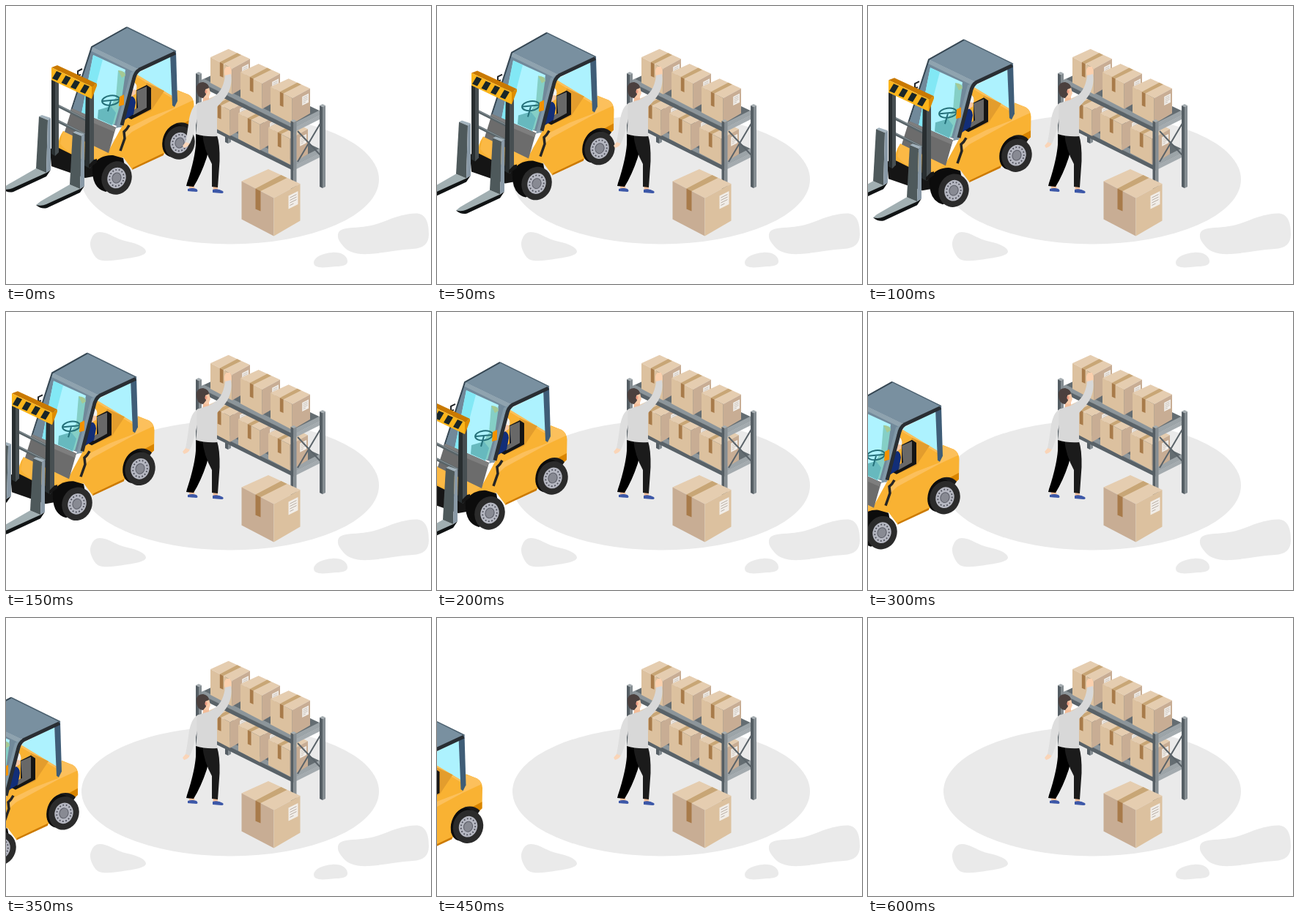
Animation, 580 px wide and 380 px high, one loop 2.6 s. Source, as an HTML page:

```html
<!DOCTYPE html>
<html lang="en">
<head>
<meta charset="utf-8">
<title>Warehouse</title>
<style>
  html, body { margin: 0; width: 100%; height: 100%; overflow: hidden; background: #fff; }
  svg { display: block; }
</style>
</head>
<body>
<svg width="580" height="380" viewBox="0 0 580 380">
  <defs>
    <g id="wheel">
      <ellipse rx="20.5" ry="23" transform="rotate(18)" fill="#2b2b2b"/>
      <ellipse rx="12.5" ry="14.5" transform="rotate(18)" fill="#b5b7c1"/>
      <ellipse rx="9.6" ry="11.4" transform="rotate(18)" fill="none" stroke="#4b4d57" stroke-width="1.8" stroke-dasharray="1.8 2.6"/>
      <ellipse rx="6" ry="7" transform="rotate(18)" fill="#888a93" stroke="#5c5e68"/>
    </g>
    <g id="fork">
      <path d="M41 222L55 228L9 251Q2 254-5 250Q0 245 8 241Z" fill="#a1afb2"/>
      <path d="M55 228L61 224L55 233L10 254Q2 256-5 250Q3 252 9 249Z" fill="#101314"/>
      <path d="M45 151L49 149L61 153L57 156Z" fill="#a3b3bd"/>
      <path d="M45 151L57 156L55 228L41 222Z" fill="#4e595b"/>
      <path d="M57 156L61 153L61 224L55 228Z" fill="#8999a6"/>
    </g>
    <g id="deck">
      <path d="M263 103L303 84L434 146L392 167Z" fill="#646d72"/>
      <path d="M263 103L270 99.500L399 163.500L392 167Z" fill="#8c959a"/>
      <path d="M386 163.500L428 142.500L434 146L392 167Z" fill="#9ca4a8"/>
      <path d="M263 103L392 167V173L263 109Z" fill="#596268"/>
      <path d="M392 167L434 146V152L392 173Z" fill="#a4abaf"/>
    </g>
    <g id="post">
      <path d="M0 2L4 0L8 2L4 4Z" fill="#a5adb1"/>
      <path d="M0 2L4 4V115L0 113Z" fill="#555e64"/>
      <path d="M4 4L8 2V113L4 115Z" fill="#858d92"/>
    </g>
  </defs>

  <g fill="#eaeaea">
    <ellipse cx="306" cy="237" rx="203" ry="88.500"/>
    <path d="M128 309C140 309 150 319 166 322C180 325 191 330 191 336C190 342 172 344 160 346C145 348 128 351 122 343C117 336 112 326 117 317C119 312 123 309 128 309Z"/>
    <path d="M453 315C452 306 460 304 472 303C492 302 505 299 520 293C535 287 553 282 564 284C575 287 577 300 577 312C577 325 570 331 555 332C535 333 515 338 495 339C478 340 466 336 460 328C456 323 453 319 453 315Z"/>
    <path d="M420 350C421 343 432 338 445 337C457 336 465 341 466 348C467 354 460 356 450 356C440 357 432 358 427 357C422 356 420 354 420 350Z"/>
  </g>

  <g id="truck">
    <!-- body -->
    <path d="M60 196L74 186L125 206V232L108 235L62 219Z" fill="#151515"/>
    <path d="M176 95L229 134L234 115L249 121Q256 125 256.500 134L256 162L215 203L172 223L160 207L122 214L104 210L72 194Q70 182 78 171L140 198L158 165Z" fill="#f9b233"/>
    <path d="M234 116L249 121Q254 124 255 129L229 141L172 172L162 181L164 166L196 151L229 136Z" fill="#fcc05c"/>
    <path d="M78 171L140 198L128 208L104 209Q82 200 74 188Z" fill="#fbb945"/>
    <path d="M173 221L215 201V204L172 224Z" fill="#cc7a00"/>
    <path d="M243 160L256 153V162L250 167Z" fill="#d98500"/>
    <path d="M214 196Q212 168 233 160Q245 157 253 165L238 187Z" fill="#1a1a1a"/>
    <ellipse cx="230" cy="184" rx="16" ry="23" transform="rotate(18 230 184)" fill="#0c0c0c"/>
    <use href="#wheel" x="237" y="187"/>

    <!-- cab interior -->
    <path d="M181 91L224 69L229 137L178 98Z" fill="#adf2fe"/>
    <path d="M179 94L230 125V139L196 152L160 170V125Z" fill="#f9b233"/>
    <path d="M179 94L230 125V128L179 97Z" fill="#fcc05c"/>
    <path d="M192 105L216 116L198 143L176 153Z" fill="#e39d2d"/>
    <path d="M178 115L192 108L198 112V141L171 155L163 151L178 140Z" fill="#151515"/>
    <path d="M178 116L192 110V139L174 149L168 146L180 139Z" fill="#686868"/>
    <path d="M164 123Q176 120 177 132L174 148L160 157L154 149Z" fill="#122e78"/>
    <path d="M167 111H177V120L171 124L166 120Z" fill="#f6c8a8"/>
    <path d="M166 113Q166 104 173 103Q180 106 178 115Z" fill="#f2f2f2"/>
    <path d="M224 66L232 62L234 130L230 138L227 136Z" fill="#3f5d77"/>

    <!-- windscreen and roof -->
    <path d="M117 56L179 86L157 166L90 143Z" fill="#71899a"/>
    <path d="M119 67L163 87Q160 108 145 166L103 147Z" fill="#aef3ff"/>
    <path d="M119 67L132 73L112 150L103 147Z" fill="#82e8f5"/>
    <path d="M153 88L163 91L158 126L148 162L131 155L150 125Z" fill="#85cfc6"/>
    <path d="M153 88Q162 88 163 95L158 98Z" fill="#a5c994"/>
    <path d="M126 142L143 137L150 146L145 163L125 154Z" fill="#67b9be"/>
    <g fill="none" stroke="#247079" stroke-width="2">
      <ellipse cx="143" cy="129" rx="12" ry="6.500" transform="rotate(-8 143 129)"/>
      <path d="M132 130L154 128M143 130L139 144"/>
    </g>
    <path d="M165 29L232 62L179 86L117 56Z" fill="#7990a0"/>
    <path d="M117 56L179 86L174 90L115 61Z" fill="#8fa3af"/>
    <path d="M165 29L117 56L89 143" fill="none" stroke="#354652" stroke-width="2"/>
    <path d="M165 29L232 62" fill="none" stroke="#4c6170" stroke-width="1.500"/>
    <path d="M170 91L178 87L158 165L150 167Z" fill="#8299a7"/>
    <path d="M231 64L182 87Q176 91 174 101L158 163" fill="none" stroke="#292e33" stroke-width="5"/>
    <path d="M90 140L150 166L140 201L80 172Z" fill="#6c6c6c"/>
    <path d="M90 140L150 166L148 172L87 146Z" fill="#7e7e7e"/>
    <path d="M104 86L98 89V95L102 94" fill="none" stroke="#202428" stroke-width="2"/>
    <path d="M155 124L161 121V135L154 137Z" fill="#f39200"/>
    <path d="M168 163Q165 169 161 172L162 181L156 198" fill="none" stroke="#252525" stroke-width="3.500"/>

    <!-- front wheel -->
    <path d="M118 218Q128 203 146 204L160 208L166 240L136 254Q116 249 118 218Z" fill="#0c0c0c"/>
    <use href="#wheel" x="151" y="235"/>

    <!-- mast -->
    <path d="M70 136L112 157M70 157L112 178" stroke="#596468" stroke-width="4"/>
    <path d="M70 135L112 156M70 156L112 177" stroke="#8b979d" stroke-width="1"/>
    <path d="M62 88L67 90V205L62 202Z" fill="#282e30"/>
    <path d="M67 90L72 88V200L67 205Z" fill="#474f52"/>
    <path d="M109 108L114 110V222L107 218Z" fill="#282e30"/>
    <path d="M114 110L120 107V215L114 222Z" fill="#474f52"/>
    <path d="M120 210L124 209V214L113 222V217Z" fill="#161616"/>
    <path d="M62 84L70 81L124 106L117 110Z" fill="#c97900"/>
    <path d="M62 84L117 110V127L62 101Z" fill="#fbb51b"/>
    <path d="M117 110L124 106V109L117 127Z" fill="#dd8c00"/>
    <path id="stripe" d="M69 89L76 92L70 102L63 99Z" fill="#192629"/>
    <use href="#stripe" x="12.500" y="6"/>
    <use href="#stripe" x="25" y="12"/>
    <use href="#stripe" x="38" y="18"/>
    <use href="#fork"/>
    <use href="#fork" x="46" y="22"/>
  </g>

  <!-- shelf -->
  <use href="#post" x="299" y="73"/>
  <use href="#deck" y="52"/>
  <g id="lower"></g>
  <use href="#deck"/>
  <g id="upper"></g>
  <path d="M398 171L431 206M431 157L398 213" stroke="#5a6369" stroke-width="2"/>
  <use href="#post" x="428" y="134"/>
  <use href="#post" x="388.500" y="155"/>
  <use href="#post" x="259" y="90"/>
  <g id="floor"></g>

  <!-- worker -->
  <g>
    <path d="M246 185L251 187Q250 192 243 194L241 191Z" fill="#fad5b8"/>
    <path d="M299 97Q296 86 301 83H306Q309 89 307 96Z" fill="#fbd0ae"/>
    <path d="M250 243H256L258 251H250ZM282 244H289V252H283Z" fill="#f2bf9c"/>
    <path d="M259 174C261 192 255 218 247 242L246 246L256 247Q266 231 274 207L281 178Z"/>
    <path d="M268 175L288 177Q292 188 291.500 212L289 248L281 247V216Q270 196 268 175Z" fill="#1b1b1b"/>
    <path d="M248 250Q254 248 260 250Q263 253 260 254L248 253ZM282 251Q289 249 296 253Q298 256 294 256L282 255Z" fill="#3d58a8"/>
    <path d="M263 132C254 136 252 146 250 154C248 168 247 177 245 186L251 188C256 178 258 167 261 154Z" fill="#dedede"/>
    <path d="M270 120L277 119V130L268 133Z" fill="#f2bd9a"/>
    <path d="M261 133Q269 130 277 128C291 121 297 112 299 95L307 93C309 104 306 116 300 124Q294 132 288 138V178Q272 179 259 175C262 160 259 146 261 133Z" fill="#d8d8d8"/>
    <path d="M270 110L277 111L279 119L276 126L269 125Z" fill="#f8cba9"/>
    <path d="M260 110Q262 104 269 104Q277 106 277 112L272 114L273 121L269 126Q259 125 260 110Z" fill="#4b403e"/>
    <ellipse cx="273" cy="117" rx="1.600" ry="2.500" fill="#ef9f85"/>
  </g>
</svg>
<script>
  const LIGHT = '#dcc19f', DARK = '#c8ad94';
  const shape = (d, fill) => `<path d="${d}" fill="${fill}"/>`;

  function addBox(group, x, y, scale, left, right) {
    document.getElementById(group).innerHTML += `<g transform="translate(${x} ${y}) scale(${scale})">` +
      shape('M0 0L36.5-16.500L80 3.500L44 23Z', '#e5cdb0') +
      shape('M0 0L44 23V75L0 52Z', left) +
      shape('M44 23L80 3.500V54L44 75Z', right) +
      shape('M19 10L26 13.500L62-4.500L54-8.500Z', '#c8a676') +
      shape('M19 10L26 13.500V41L19 38Z', '#a87b4a') +
      shape('M64 20L77 13.500V31.500L64 38Z', '#f1ede8') +
      '<path d="M66 22.500L75 18M66 26L75 21.500M66 29.500L75 25M66 33L71 30.500" stroke="#b9afa6"/></g>';
  }

  for (let i = 0; i < 3; i++) {
    addBox('lower', 276 + 41 * i, 127 + 19.500 * i, 0.675, LIGHT, DARK);
    addBox('upper', 279 + 41 * i, 70 + 20.200 * i, 0.675, LIGHT, DARK);
  }
  addBox('floor', 321.500, 239.500, 1, DARK, LIGHT);

  // Distance driven to the left, one entry per 50 ms step
  const drive = [0, 15, 34, 54, 79, 105, 132, 158, 177, 194.500, 194.500, 224, 320];
  const truck = document.getElementById('truck');

  function draw(now) {
    const step = Math.floor(now % 2600 / 50);
    const x = drive[Math.min(step, drive.length - 1)];
    truck.setAttribute('transform', `translate(${-x} ${x * 0.505})`);
    requestAnimationFrame(draw);
  }
  draw(0);
</script>
</body>
</html>
```
